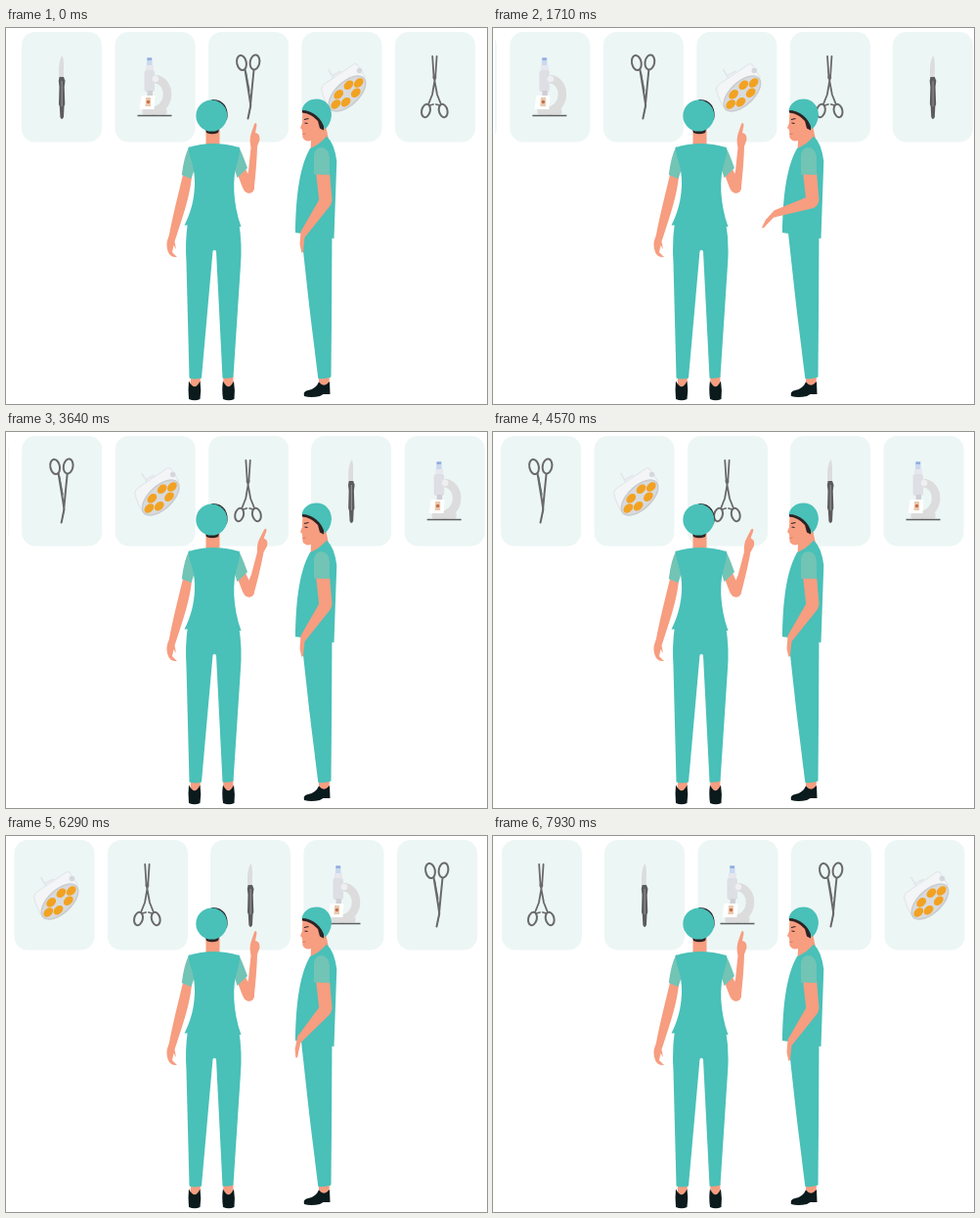
These frames come from a looping animation (492 by 384 pixels, 8000 ms). An HTML page:

```html
<!DOCTYPE html>
<html lang="en">
<head>
<meta charset="utf-8">
<title>Choosing surgical instruments</title>
<style>
html, body { margin: 0; width: 100%; height: 100%; overflow: hidden; background: #fff; }
svg { display: block; width: 492px; height: 384px; }
.card { fill: #ecf6f5; }
.scrub { fill: #49c0b8; }
.sleeve { fill: #72c4b5; }
.skin { fill: #f79d80; }
.dark { fill: #0b1a1c; }
.hair { fill: #2c2325; }
.steel { fill: none; stroke: #696969; stroke-width: 2; stroke-linecap: round; stroke-linejoin: round; }
</style>
</head>
<body>
<svg viewBox="0 0 492 384" xmlns="http://www.w3.org/2000/svg">
  <defs>
    <clipPath id="window"><rect x="2" y="0" width="489" height="120"/></clipPath>

    <g id="scalpel">
      <path fill="#dcdcdc" d="M41.800 28 C38.500 32 37.500 40 38.300 51 H43 C42.600 43 43.800 35 41.800 28Z"/>
      <path fill="#5c5c5c" d="M38.600 50 H43 L44.500 54 L43.700 60 L44.300 78 L43.500 80 L43 91 Q41 95 39.400 91 L38.800 80 L38 78 L38.500 60 L37.800 54Z"/>
      <path stroke="#8f8f8f" stroke-width="1.200" d="M41.200 54 V80"/>
    </g>

    <g id="microscope">
      <path fill="none" stroke="#dcdcdc" stroke-width="8.500" d="M41 52 C49 53 54 60 53.500 69 C53 77 47 84 38 85"/>
      <rect x="28" y="82" width="25" height="6.500" rx="2" fill="#dcdcdc"/>
      <rect x="32.500" y="30" width="5.500" height="10" rx="1" fill="#cbd8ef"/>
      <rect x="33" y="30.500" width="4.500" height="2.500" fill="#8fb0df"/>
      <rect x="31.500" y="38" width="8" height="6" fill="#e7e7ee"/>
      <rect x="30" y="43" width="10.500" height="22" rx="2.500" fill="#dedee5"/>
      <circle cx="41.500" cy="52" r="3.300" fill="#efeff2"/>
      <rect x="33" y="64" width="5.500" height="6" fill="#cfcfd5"/>
      <path fill="#fff" d="M27 69 H41 L40 83 H25Z"/>
      <path fill="#e9c9ad" d="M31.500 71 H36.500 V80 H31Z"/>
      <circle cx="34" cy="75.500" r="1.700" fill="#c66d4a"/>
      <path stroke="#5d5d5d" stroke-width="1.500" d="M23 89.600 H58"/>
    </g>

    <g id="scissors" class="steel">
      <ellipse cx="34" cy="35.500" rx="4.800" ry="7.600" transform="rotate(-12 34 35.500)"/>
      <ellipse cx="47.500" cy="35" rx="4.800" ry="7.600" transform="rotate(10 47.500 35)"/>
      <path d="M37.500 42.500 L42 70 L43.300 79 L40.500 92.500 M46.500 43 L45 58 L43 79"/>
      <path stroke-width="1.200" d="M38.500 45 L42 64 M43.300 79 L41.800 87"/>
    </g>

    <g id="lamp">
      <path fill="none" stroke="#e3e6e8" stroke-width="1.500" d="M27 42 L33 52 M31 49 L40 44"/>
      <path fill="#f3f5f6" stroke="#e0e4e6" d="M20 62 Q21 58 25 56 L54 36.500 Q57 36 59 41 L65 50 L31 85 Q23 76 20 62Z"/>
      <circle cx="59" cy="43.500" r="2.800" fill="#d4d8dd"/>
      <g transform="translate(46.500 67) rotate(-43)">
        <ellipse rx="24" ry="12.500" fill="#c9cbce"/>
        <ellipse rx="22.500" ry="11" fill="#d8dadc"/>
        <g id="bulbs" fill="#f2a222"></g>
      </g>
    </g>

    <g id="clamp" class="steel">
      <ellipse cx="31.500" cy="84.500" rx="4.300" ry="6.800" transform="rotate(14 31.500 84.500)"/>
      <ellipse cx="49.200" cy="84.500" rx="4.300" ry="6.800" transform="rotate(-14 49.200 84.500)"/>
      <path stroke-width="1.800" d="M34 78 L38 68 L41.300 49 L42.600 29 M47 78 L43 68 L39.500 49 L38.200 29 M35.500 79 L39 78 M45.500 79 L42 78"/>
      <circle cx="40.400" cy="50.500" r="1"/>
    </g>

    <g id="strip"></g>
  </defs>

  <rect width="492" height="384" fill="#fff"/>
  <g clip-path="url(#window)">
    <g id="belt">
      <use href="#strip"/>
      <use href="#strip" x="487"/>
    </g>
  </g>

  <g id="woman">
    <path class="skin" d="M181.500 148 L190 152 C188 172 181 192 174.500 212 L172.500 218 L174 226 L171.500 222 L170 229 L175 234 Q168 234.500 166 229 Q163.500 223 165 217 L167 211 C170 195 176 170 181.500 148Z"/>
    <path class="skin" d="M237 150 L245 144 L254 163 Q252 169 248 168.500 Q244 168 242 163Z"/>
    <g id="point">
      <path class="skin" d="M243.500 163 L248 146 L250.500 122 Q248.500 113 251 107 L254 98 Q256 95.500 256.500 99 L255 107 Q260 108 259.500 114 L257 121 C256.500 140 254.500 156 253.800 165 Q251.500 170 246 168Z"/>
    </g>
    <path class="skin" d="M204.500 102 H218.500 V118 Q212 122 204.500 119Z"/>
    <path class="skin" d="M189 355 H199 L198 370 H188.500Z M222 355 H232.500 L232 370 H223Z"/>
    <path class="dark" d="M187 360.500 Q193 372 198.500 360.500 Q200 370 198.500 379 Q193 381.500 187 379 Q186 369 187 360.500Z M222 360.500 Q227.500 372 233 360.500 Q234.500 370 233.500 379 Q228 381.500 222 379 Q220.500 369 222 360.500Z"/>
    <path class="scrub" d="M186 198 H238 Q242 220 239.800 245 L232.500 356.500 Q227 358.500 221.500 357.500 L215 228 Q213 225.500 211.500 228 L200 357.500 Q193 359.500 187.500 357.500 L184.500 240 Q183 218 186 198Z"/>
    <path class="sleeve" d="M187.500 121 Q182 131 179.800 150 L189.500 154 L196 135Z M238 121 Q242 129 247 143 L236.500 153 L231 135Z"/>
    <path class="scrub" d="M186.500 122 Q212 114 238.500 122 Q240 126 237 136 C231 153 232 179 240.500 203 Q210 199.500 182.500 201.500 C194 180 195.500 154 190 137 Q187 128 186.500 122Z"/>
    <path class="hair" d="M203 100 H219 L217 107 Q211 109.500 205 107Z M210 73 Q219 72 224 79 Q228 86 226 94 L220 95Z"/>
    <circle class="scrub" cx="210.300" cy="89.600" r="16"/>
  </g>

  <g id="man">
    <path class="skin" d="M303.500 82 L303 97 L301 102 L303 104 L303.500 112 Q306 116.500 312 115 L311.500 125 L330 114 L325 90Z"/>
    <path class="hair" d="M303 84 Q314 82 325.500 97 L325 104.500 L321 102.500 L319 95 Q312 87 303 86.500Z"/>
    <path fill="none" stroke="#2c2325" stroke-width="1.200" d="M305 93.500 L309.500 92.500 M305.500 97 L308.500 97.500"/>
    <path fill="none" stroke="#d87966" d="M303.500 108.500 L306.500 108"/>
    <path class="scrub" d="M302.500 84 C304 77 310 72.500 317.500 72.500 C327 72.500 333 80 333 89 Q332 99 326 103.500 C323 92 314 84 302.500 84Z"/>
    <path class="skin" d="M320 355 H331 L330 370 H320Z"/>
    <path class="dark" d="M320 361.500 Q325 368 331 361 L331.500 374 H324.500 L321 376 Q312 378 305 376 Q303.500 371 309 370 Q317 368.500 320 361.500Z"/>
    <path class="scrub" d="M301.500 205 H333.500 L333 300 L332.500 356.500 Q326 359 319.300 358 L310.300 285Z"/>
    <path class="scrub" d="M311 123 Q321 119 328 110.500 Q336 118 338.300 136 L335.500 215 L296 209 C296.500 180 298.500 145 311 123Z"/>
    <path class="skin" d="M317 147 H331 L333.500 176 Q332 184 325 183 Q320 180 320 174Z"/>
    <g id="reach">
      <path class="skin" d="M320.500 175 L301.500 208 L300.500 221 L302.300 229.500 Q304.500 230 304.300 225 L305.500 214 L332 181 Q334.500 174 328 172Z"/>
    </g>
    <path class="sleeve" d="M315 149.500 V130 Q316 122 323 122 Q330 123 331 132 V150Z"/>
  </g>
</svg>
<script>
const LOOP = 8000, FPS = 14, CARD_GAP = 95.5;
const TOOLS = ["scalpel", "microscope", "scissors", "lamp", "clamp"];
const STOPS = [0, 99, 198, 294, 390];
const $ = id => document.getElementById(id);

$("bulbs").innerHTML = [[-16, 0], [-7, -5.4], [-7, 5.4], [7, -5.4], [7, 5.4], [16, 0]]
  .map(([x, y]) => `<ellipse cx="${x}" cy="${y}" rx="5.600" ry="3.900"/>`).join("");

$("strip").innerHTML = TOOLS.map((tool, i) =>
  `<g transform="translate(${16 + CARD_GAP * i} 0)">
     <rect class="card" y="4" width="82" height="112.500" rx="14"/><use href="#${tool}"/>
   </g>`).join("");

const clamp01 = v => Math.min(1, Math.max(0, v));
const smooth = v => (1 - Math.cos(Math.PI * clamp01(v))) / 2;
const ramp = (t, from, to) => smooth((t - from) / (to - from));
const swing = (t, from, to) => Math.sin(Math.PI * clamp01((t - from) / (to - from))) ** 2;

// Symmetric cubic Bezier easing, solved by bisection.
function glide(u) {
  let lo = 0, hi = 1;
  for (let i = 0; i < 24; i++) {
    const s = (lo + hi) / 2, r = 1 - s;
    const x = 3 * r * r * s * 0.75 + 3 * r * s * s * 0.25 + s ** 3;
    if (x < u) lo = s; else hi = s;
  }
  return lo * lo * (3 - 2 * lo);
}

function beltShift(t) {
  return STOPS.slice(1).reduce((sum, stop, i) => {
    const u = clamp01((t - 2000 * i - 357) / 1786);
    return sum + (stop - STOPS[i]) * glide(u);
  }, 0);
}

function draw(time) {
  const t = Math.floor((time % LOOP + 5) * FPS / 1000) * 1000 / FPS;
  const lift = swing(t, 900, 2540) + swing(t, 6060, 7700);
  const tilt = ramp(t, 3140, 3780) - ramp(t, 4400, 5140);
  $("belt").setAttribute("transform", `translate(${-beltShift(t)} 0)`);
  $("reach").setAttribute("transform", `rotate(${38 * lift} 326 177)`);
  $("point").setAttribute("transform", `rotate(${10 * tilt} 249 164)`);
}

const start = performance.now();
function tick() {
  draw(performance.now() - start);
  requestAnimationFrame(tick);
}
tick();
</script>
</body>
</html>
```
